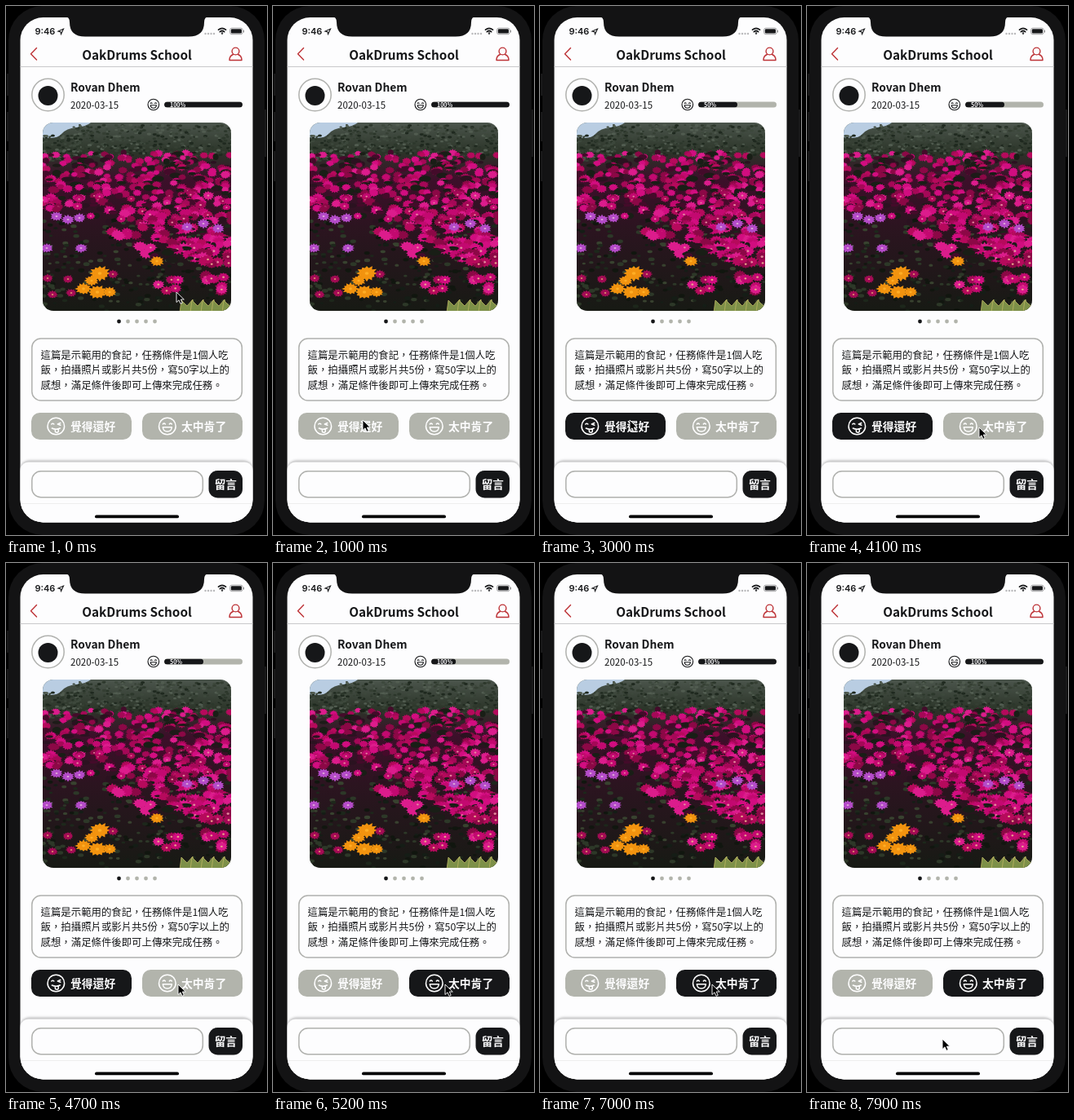
Animation of 320x649 px, one loop 8 s. Source, as an HTML page:

```html
<!DOCTYPE html>
<html lang="zh-Hant">
<head>
<meta charset="utf-8">
<title>Review screen</title>
<style>
html, body { margin: 0; width: 100%; height: 100%; overflow: hidden; background: #000; }
svg { display: block; width: 320px; height: 649px; font-family: "Noto Sans CJK TC", "Noto Sans CJK", sans-serif; fill: #161719; }
.bold { font-weight: 700; }
.line { fill: none; stroke-linecap: round; stroke-linejoin: round; }
.grey { stroke: #b0b1ae; stroke-width: 1.5; fill: #fdfdfe; }
.white { fill: #fdfdfe; }
</style>
</head>
<body>
<svg viewBox="0 0 320 649">
  <defs>
    <clipPath id="screen"><rect x="17.5" y="14" width="285" height="619.5" rx="28"/></clipPath>
    <clipPath id="photoClip"><rect x="45" y="143" width="231" height="231" rx="13"/></clipPath>
    <clipPath id="barClip"><rect x="194" y="117.5" width="96" height="7" rx="3.5"/></clipPath>
    <linearGradient id="hill" x1="0" y1="0" x2="0" y2="1">
      <stop offset="0" stop-color="#4b554c"/>
      <stop offset=".16" stop-color="#2b3428"/>
      <stop offset=".3" stop-color="#3d0f2a"/>
      <stop offset=".55" stop-color="#2c1420"/>
      <stop offset="1" stop-color="#171a14"/>
    </linearGradient>
    <filter id="shade" x="-10%" y="-20%" width="120%" height="140%"><feGaussianBlur stdDeviation="1.5"/></filter>
    <g id="wink" class="line">
      <circle r="10.3"/>
      <path d="M-5.500-2.500q1.500-1.500 3 0M5.500-4l-3.500 1.500 3.500 1.200M-5 2.500q5 2.500 10 0M-1 3.800v2a2 2 0 0 0 4 0V3.600"/>
    </g>
    <g id="laugh" class="line">
      <circle r="10.3"/>
      <path d="M-5.500-2.500q1.500-2 3 0M2.500-2.500q1.500-2 3 0M-5.500 1.200H5.500Q5 6.500 0 6.500T-5.500 1.200z"/>
    </g>
  </defs>

  <!-- Phone -->
  <path d="M1 83h3v27H1zM1 130h3v36H1zM1 178h3v37H1zM316 127h3v58h-3z" fill="#19191a"/>
  <rect x="3" y="0" width="314" height="649" rx="42" fill="#131314"/>
  <rect x="17.5" y="14" width="285" height="619.5" rx="28" class="white"/>
  <path d="M72 13q6 0 6 7 0 17.500 19 17.500H224q19 0 19-17.500 0-7 6-7z" fill="#131314"/>

  <!-- Status bar -->
  <text x="35.5" y="35" font-size="11" font-weight="600" font-family="Inter, sans-serif">9:46</text>
  <path d="M64 31l6.500-3-3 6.500-.6-2.900z" fill="none" stroke="#161719" stroke-width="1.1"/>
  <g fill="#b9b9bb"><circle cx="244.5" cy="34" r="1.2"/><circle cx="248" cy="34" r="1.2"/><circle cx="251.5" cy="34" r="1.2"/><circle cx="255" cy="34" r="1.2"/></g>
  <g class="line" stroke="#161719" stroke-width="1.7"><path d="M260.5 29.2q4.500-3.800 9 0M262.300 31.600q2.700-2.200 5.400 0"/><circle cx="265" cy="33.600" r=".4"/></g>
  <rect x="274.600" y="27.100" width="15.500" height="7.600" rx="2.300" fill="none" stroke="#8c8c8e" stroke-width=".8"/>
  <rect x="275.800" y="28.300" width="13.100" height="5.200" rx="1.300"/>
  <rect x="291" y="29.500" width="1" height="3" rx=".5" fill="#8c8c8e"/>

  <!-- Header -->
  <g class="line" stroke="#bd3236" stroke-width="1.4">
    <path d="M37.500 51.500l-7 7.300 7 7.300"/>
    <circle cx="281.500" cy="55.500" r="4.400"/>
    <path d="M278.500 59.500q-4.500 1.500-4.500 7h15q0-5.500-4.500-7"/>
  </g>
  <text x="160.500" y="66" text-anchor="middle" class="bold" font-size="15.300">OakDrums School</text>
  <path d="M17.500 74.500H302.500" stroke="#c9c9cb"/>

  <!-- Author -->
  <circle cx="51.500" cy="109" r="19.700" class="grey"/>
  <circle cx="51.500" cy="110" r="12"/>
  <text x="79" y="104.500" class="bold" font-size="13.800">Rovan Dhem</text>
  <text x="79" y="125.700" font-size="11.500" font-weight="500">2020-03-15</text>
  <use href="#laugh" transform="translate(180.800 121) scale(.66)" stroke="#161719" stroke-width="1.700"/>
  <g clip-path="url(#barClip)">
    <rect x="194" y="117" width="96" height="8" fill="#b2b4ac"/>
    <rect id="fill" x="194" y="117.500" height="7" rx="3.500"/>
  </g>
  <text id="percent" x="201" y="123.800" class="bold white" font-size="7"></text>

  <g id="photo" clip-path="url(#photoClip)">
    <rect x="45" y="143" width="231" height="231" fill="url(#hill)"/>
    <path d="M45 143H104Q98 148 86 149T68 157 45 161z" fill="#b9cde2"/>
  </g>

  <g id="dots"></g>

  <!-- Post text -->
  <rect x="31.800" y="408" width="257.500" height="76" rx="11" class="grey"/>
  <g font-size="12.400" font-weight="500">
    <text x="42.600" y="433">這篇是示範用的食記，任務條件是1個人吃</text>
    <text x="42.600" y="451.300">飯，拍攝照片或影片共5份，寫50字以上的</text>
    <text x="42.600" y="469.600">感想，滿足條件後即可上傳來完成任務。</text>
  </g>

  <!-- Votes -->
  <rect id="okay" x="31" y="499" width="123" height="33" rx="10.500"/>
  <rect id="fair" x="167" y="499" width="123" height="33" rx="10.500"/>
  <g stroke="#fff" stroke-width="1.500">
    <use href="#wink" x="61.300" y="515.500"/>
    <use href="#laugh" x="197.800" y="515.500"/>
  </g>
  <g class="bold white" font-size="13.800">
    <text x="79" y="520.700">覺得還好</text>
    <text x="215" y="520.700">太中肯了</text>
  </g>

  <!-- Comment panel -->
  <g clip-path="url(#screen)">
    <rect x="17" y="557.500" width="286" height="90" rx="12" fill="#bcbcbd" filter="url(#shade)"/>
    <rect x="17" y="559.500" width="286" height="90" rx="11" class="white"/>
    <path d="M17 610.500H303" stroke="#eee"/>
  </g>
  <rect x="31.800" y="570.800" width="209.500" height="32" rx="11" class="grey"/>
  <rect x="248.500" y="570" width="41.500" height="33.500" rx="11"/>
  <text x="269.300" y="592" text-anchor="middle" class="bold white" font-size="13.600">留言</text>
  <rect x="109" y="624.500" width="103" height="3.800" rx="1.900" fill="#000"/>

  <path id="cursor" d="M0 0V12.500L3 9.800 5 14.300 7.200 13.300 5.300 9H9.300z" fill="#000" stroke="#fff" stroke-width=".9"/>
</svg>
<script>
const $ = id => document.getElementById(id);
const add = (parent, tag, attrs) => {
  const el = document.createElementNS("http://www.w3.org/2000/svg", tag);
  for (const k in attrs) el.setAttribute(k, attrs[k]);
  $(parent).append(el);
};
let seed = 7;
const rand = (a = 0, b = 1) => {
  seed = (seed * 16807) % 2147483647;
  return a + (b - a) * seed / 2147483647;
};
const pick = list => list[Math.floor(rand(0, list.length))];
const blob = (cx, cy, rx, ry, fill) => add("photo", "ellipse", { cx, cy, rx, ry, fill });

const scatter = (n, x0, x1, y0, y1, size, colours) => {
  for (let i = 0; i < n; i++) {
    const r = rand(size * .5, size);
    blob(rand(x0, x1), rand(y0, y1), r, r * .6, pick(colours));
  }
};

// A flower is a ragged star with a pale heart.
function flower(x, y, r, fill, heart) {
  let d = "";
  for (let i = 0; i < 24; i++) {
    const a = i * Math.PI / 12, s = i % 2 ? r * .7 : r * rand(.85, 1.1);
    d += `${i ? "L" : "M"}${(x + s * Math.cos(a)).toFixed(1)} ${(y + s * .75 * Math.sin(a)).toFixed(1)}`;
  }
  add("photo", "path", { d: d + "z", fill });
  if (heart) blob(x, y, r * .18, r * .14, heart);
}

const hedge = ["#2c372b", "#3d483c", "#515c50", "#1f291f", "#353f33"];
const shadows = ["#1d1b18", "#2b1220", "#191e16", "#440b2a"];
const pinks = ["#c30970", "#a50857", "#d20d80", "#8c0846", "#dc1c8c", "#b60a5c"];
scatter(420, 80, 280, 146, 186, 2.8, hedge);
scatter(130, 45, 95, 159, 190, 2.8, hedge);
scatter(260, 45, 276, 260, 374, 4, ["#11160f", "#1d271b", "#2d3828", "#151d16", "#38422f"]);

// Blossom thins out toward the lower left, with dark gaps between the clumps.
for (let i = 0; i < 620; i++) {
  const y = 180 + i / 4.6, x = rand(45, 278);
  if (y > 250 && x < 45 + (y - 250) * 1.5 + 45) continue;
  if (rand() < .36) blob(x, y, rand(3, 8), rand(1.5, 4), pick(shadows));
  else flower(x, y, rand(4, 6.5) + (y - 180) / 40, pick(pinks), y > 225 && rand() < .4 && "#e58b9e");
}
for (let i = 0; i < 17; i++) flower(rand(175, 276), rand(305, 352), 8, pick(pinks), "#e8a88c");
[[57, 354], [76, 335], [80, 352], [131, 329], [51, 334]].forEach(([x, y]) => flower(x, y, 7, "#a50b55", "#d98a6c"));
[[62, 258], [76, 262], [92, 297], [50, 297], [222, 271], [260, 273], [90, 260], [242, 267]]
  .forEach(([x, y]) => flower(x, y, 8, "#b44bc8", "#e0acd8"));
[[185, 313, 9], [115, 328, 13], [95, 347, 10], [112, 351, 12], [127, 351, 9], [105, 337, 9]]
  .forEach(([x, y, r]) => flower(x, y, r, "#f2930f", "#ffae25"));
for (let x = 213; x < 280; x += 13)
  add("photo", "path", { d: `M${x} 376l2-15 7 7 7-8 1 16z`, fill: "#7d9048", stroke: "#bdb562", "stroke-width": .8 });

for (let i = 0; i < 5; i++)
  add("dots", "circle", { cx: 138.5 + 11 * i, cy: 387, r: 2.4, fill: i ? "#b2b4ac" : "#161719" });

// Cursor stops: time, x, y
const stops = [[0, 209, 351], [100, 209, 351], [900, 110, 508], [3050, 110, 508], [3350, 155, 524],
  [3750, 211, 517], [7000, 211, 517], [7600, 166, 584], [8000, 166, 584]];
const LOOP = 8000, FIRST = 1160, SECOND = 4730, GROW = 1500;

function draw(now) {
  const t = now % LOOP;
  const i = stops.findIndex(s => s[0] > t);
  const [t0, x0, y0] = stops[i - 1], [t1, x1, y1] = stops[i];
  const p = (t - t0) / (t1 - t0), e = p * p * (3 - 2 * p);
  $("cursor").setAttribute("transform", `translate(${x0 + (x1 - x0) * e} ${y0 + (y1 - y0) * e})`);

  const vote = t < FIRST ? 0 : t < SECOND ? 1 : 2;
  const share = vote === 1 ? .5 : 1;
  const grown = vote ? Math.min(1, (t - (vote === 1 ? FIRST : SECOND)) / GROW) : 1;
  $("fill").setAttribute("width", 96 * share * grown);
  $("percent").textContent = share * 100 + "%";
  $("okay").setAttribute("fill", vote === 1 ? "#161719" : "#b2b4ac");
  $("fair").setAttribute("fill", vote === 2 ? "#161719" : "#b2b4ac");
}
const start = performance.now();
function tick() {
  draw(performance.now() - start);
  requestAnimationFrame(tick);
}
draw(0);
requestAnimationFrame(tick);
</script>
</body>
</html>
```
